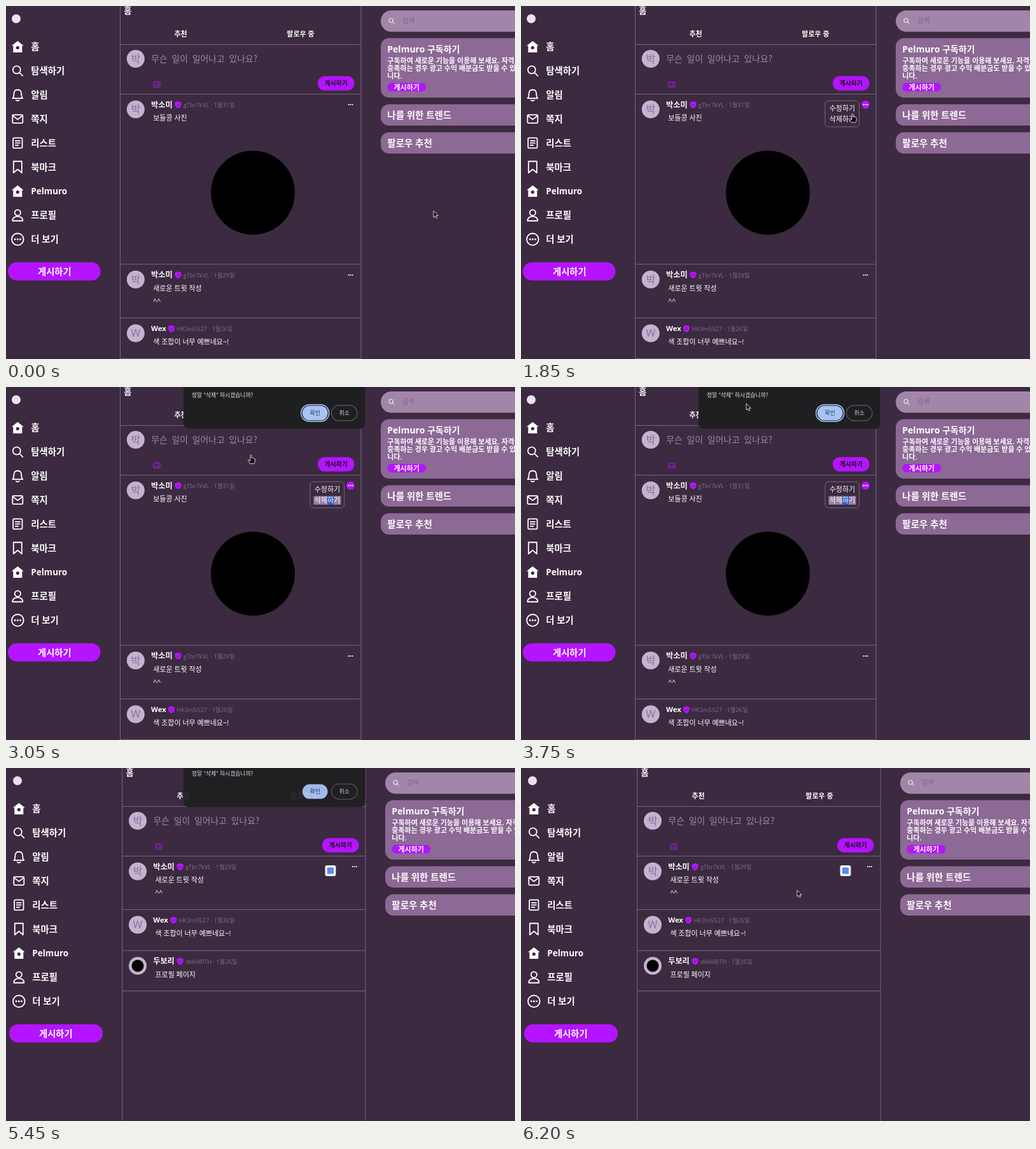
Recreate the animation shown at these times as an HTML page. Size 800 by 555 pixels, loop 6250 ms.

```html
<!DOCTYPE html>
<html lang="ko">
<head>
<meta charset="utf-8">
<title>홈</title>
<style>
html, body { margin: 0; width: 100%; height: 100%; overflow: hidden; background: #3c2a40; }
svg { display: block; width: 800px; height: 555px; }
text { font-family: "Open Sans", "Noto Sans CJK KR", "Noto Sans CJK", sans-serif; white-space: pre; }
text.mono { font-family: "Noto Sans Mono CJK KR", "Noto Sans CJK KR", "Noto Sans CJK", monospace; }
</style>
</head>
<body>
<svg id="stage" viewBox="0 0 800 555" xmlns="http://www.w3.org/2000/svg"></svg>
<script>
const LOOP = 6250, STEP = 50;
const C = {
  bg: '#3c2a40', line: '#7a6482', accent: '#b414ff', muted: '#876891', hint: '#a287ab',
  search: '#a286a9', card: '#8d6996', face: '#c5b2ce', letter: '#8f6b99', white: '#fff'
};

// Text is placed by its vertical centre.
function label(x, cy, size, str, o = {}) {
  return `<text x="${x}" y="${cy + size * 0.365}" font-size="${size}" font-weight="${o.w || 400}"
    fill="${o.c || C.white}" text-anchor="${o.a || 'start'}" class="${o.k || ''}">${str}</text>`;
}
const bold = (x, cy, size, str, c) => label(x, cy, size, str, { w: 700, c });
const rect = (x, y, w, h, r, fill, extra = '') =>
  `<rect x="${x}" y="${y}" width="${w}" height="${h}" rx="${r}" fill="${fill}" ${extra}/>`;
const disc = (x, y, r, fill, extra = '') => `<circle cx="${x}" cy="${y}" r="${r}" fill="${fill}" ${extra}/>`;
const path = (d, fill, extra = '') => `<path d="${d}" fill="${fill}" ${extra}/>`;
const line = (x1, y1, x2, y2) => path(`M${x1} ${y1}L${x2} ${y2}`, 'none', `stroke="${C.line}"`);
const at = (x, y, body) => `<g transform="translate(${x} ${y})">${body}</g>`;
const dots = (x, y, gap, r) => [-1, 0, 1].map(i => disc(x + i * gap, y, r, C.white)).join('');

const pen = `stroke="${C.white}" stroke-width="1.8" stroke-linejoin="round" stroke-linecap="round"`;
const glass = s => `<g transform="scale(${s})">` + disc(-1.5, -1.5, 6, 'none', pen) + path('M3 3L8 8', 'none', pen) + '</g>';
const icons = {
  home: path('M0 -9L9.5 -1.5H7V9H-7V-1.5H-9.5Z', C.white) + disc(0, 1.5, 2.6, C.bg),
  search: glass(1),
  bell: path('M-8 5.5C-5 3 -6.5 -1 -5.5 -4C-4.5 -9.3 4.5 -9.3 5.5 -4C6.5 -1 5 3 8 5.5Z', 'none', pen) +
    path('M-2.5 8.2Q0 10.5 2.5 8.2', 'none', pen),
  mail: rect(-8, -6.5, 16, 13, 1.5, 'none', pen) + path('M-7.5 -5L0 0.8L7.5 -5', 'none', pen),
  list: rect(-7.2, -8, 14.4, 16, 1.5, 'none', pen) +
    path('M-3.5 -3.5H3.5M-3.5 0H3.5M-3.5 3.5H1', 'none', pen),
  mark: path('M-6.5 -9H6.5V9L0 3.5L-6.5 9Z', 'none', pen),
  user: disc(0, -4, 4.6, 'none', pen) + path('M-8 8.8C-8.5 -0.5 8.5 -0.5 8 8.8Z', 'none', pen),
  more: disc(0, 0, 9.3, 'none', pen) + dots(0, 0, 4.2, 1.5)
};
const menu = [
  ['home', '홈'], ['search', '탐색하기'], ['bell', '알림'], ['mail', '쪽지'], ['list', '리스트'],
  ['mark', '북마크'], ['home', 'Pelmuro'], ['user', '프로필'], ['more', '더 보기']
];

function sidebar(dx, btnW) {
  const rows = menu.map(([icon, name], i) => {
    const y = 64 + i * 37.85;
    return at(18.3 + dx, y, icons[icon]) + bold(39.3 + dx, y, name === 'Pelmuro' ? 13.5 : 14.4, name);
  });
  return disc(16 + dx, 20, 7, '#e9e2ec') + rows.join('') +
    rect(3 + dx, 403, btnW, 28.5, 14, C.accent) + bold(50 + dx, 417.5, 14.3, '게시하기');
}

function avatar(x, y, letter) {
  return disc(x, y, 14, C.face) + (letter
    ? label(x, y, 16, letter, { c: C.letter, a: 'middle' })
    : disc(x, y, 9.5, '#000'));
}

const shield = path('M0 -5.5L5 -3.8V0Q4.6 4 0 5.8Q-4.6 4 -5 0V-3.8Z', C.accent) +
  path('M-2 0L-0.5 1.6L2.2 -1.4', 'none', `stroke="${C.bg}" stroke-width="0.9"`);

const people = {
  park: { name: '박소미', letter: '박', id: 'gTbr7kVL', w: 34 },
  wex: { name: 'Wex', letter: 'W', id: 'HK3m5527', w: 23.5, size: 11.3 },
  duri: { name: '두보리', letter: '', id: 'dk8eRlTH', w: 34 }
};

function post(left, top, who, date, lines) {
  const p = people[who], x = left + 48.5, y = top + 16.8;
  return avatar(left + 24.3, top + 24, p.letter) + bold(x, y, p.size || 12.2, p.name) +
    at(x + p.w + 8.5, y, shield) +
    label(x + p.w + 16.8, y + 0.7, 9.3, `${p.id} · ${date}`, { c: C.muted }) +
    lines.map((s, i) => label(x + 3.2, top + 37.8 + i * 20, 11, s)).join('');
}

function feed(left, right, tab1, tab2, rules) {
  const x = left + 48.8, btn = right - 68;
  return line(left, 0, left, 555) + line(right, 0, right, 555) +
    rules.map(y => line(left, y, right, y)).join('') +
    bold(left + 5.7, 7.5, 13.2, '홈') +
    label(tab1, 44.3, 11, '추천', { w: 700, a: 'middle' }) +
    label(tab2, 44.3, 11, '팔로우 중', { w: 700, a: 'middle' }) +
    avatar(left + 24.3, 83, '박') +
    label(x, 83, 13.8, '무슨 일이 일어나고 있나요?', { c: C.hint, k: 'mono' }) +
    at(left + 57.5, 123.5, rect(-5, -4, 10, 8, 1, 'none', `stroke="${C.accent}"`) +
      path('M-4.5 3L-1.5 -0.5L0.5 1.5L2 0.2L4.5 3', 'none', `stroke="${C.accent}"`) +
      disc(2, -1.5, 0.8, C.accent)) +
    rect(btn, 110.3, 57.5, 22.5, 11, C.accent) + bold(btn + 10.7, 121.8, 9.8, '게시하기', '#1c0f20');
}

function aside(x) {
  const box = (y, h, r, c) => rect(x, y, 300, h, r, c), tx = x + 10.3;
  const note = ['구독하여 새로운 기능을 이용해 보세요. 자격을', '충족하는 경우 광고 수익 배분금도 받을 수 있습', '니다.'];
  return box(7, 33.5, 16.5, C.search) + at(x + 17, 23.5, glass(0.55)) +
    label(x + 33.5, 23.3, 10.9, '검색', { c: '#82648a' }) +
    box(50.5, 93.5, 13, C.card) + bold(tx, 68, 14, 'Pelmuro 구독하기') +
    note.map((s, i) => bold(tx, 85.7 + i * 12.1, 11, s)).join('') +
    rect(tx, 121, 61, 13.3, 6.6, C.accent) + bold(tx + 10.2, 127.9, 11, '게시하기') +
    box(154.5, 33.5, 13, C.card) + bold(tx, 171.3, 14.5, '나를 위한 트렌드') +
    box(198.5, 33.5, 13, C.card) + bold(tx, 215.3, 14.5, '팔로우 추천');
}

const hello = ['새로운 트윗 작성', '^^'], praise = ['색 조합이 너무 예쁘네요~!'];

const before = sidebar(0, 145.5) +
  feed(179.5, 558, 274.5, 463, [60.5, 138.5, 406, 490.5, 554.5]) +
  post(179.5, 138.5, 'park', '1월31일', ['보들콩 사진']) + disc(388, 293.5, 66, '#000') +
  `<g id="hot">${disc(541.5, 155, 6.5, C.accent)}</g>` + dots(541.5, 155, 3, 1.1) +
  post(179.5, 406, 'park', '1월29일', hello) + dots(541.5, 423, 3, 1.1) +
  post(179.5, 490.5, 'wex', '1월26일', praise) + aside(589) +
  `<g id="popup">${rect(478, 149, 53.5, 41, 5, C.bg, `stroke="${C.line}"`)}
    <g id="hover">${rect(483.5, 171.5, 43, 13.5, 0, '#9a80a3')}</g>
    <g id="chosen">${rect(505, 171.5, 10.3, 13.5, 0, '#2f62c4')}</g>
    ${label(484.7, 160.5, 11, '수정하기')}${label(484.7, 178.3, 11, '삭제하기')}</g>`;

const after = sidebar(2, 147) +
  feed(182.7, 565, 278.5, 469, [60.5, 138.5, 222.5, 287, 350.5]) +
  post(182.7, 138.5, 'park', '1월29일', hello) + dots(548, 155, 3, 1.1) +
  rect(501.5, 153, 17, 17, 3, '#f1f1f5') + rect(505, 156.5, 10, 10, 0, '#5b8def') +
  post(182.7, 222.5, 'wex', '1월26일', praise) +
  post(182.7, 287, 'duri', '1월26일', ['프로필 페이지']) + aside(596);

const dialog = rect(279, -30, 285.5, 95.5, 8, '#1f1f21', 'stroke="#2d2830" stroke-width="0.8"') +
  label(292, 12.5, 8.8, '정말 "삭제" 하시겠습니까?', { c: '#e6e4e8' }) +
  `<g id="ring">${rect(463.7, 27.7, 44, 26.6, 13.3, 'none', 'stroke="#a8c7fa" stroke-width="1.5"')}</g>` +
  rect(465.8, 29.5, 39.8, 23, 11.5, '#a8c3f2') +
  label(485.7, 41, 9, '확인', { c: '#20386b', a: 'middle' }) +
  rect(511.5, 29, 40.5, 24, 12, 'none', 'stroke="#5b5068" stroke-width="1.3"') +
  label(531.7, 41, 9, '취소', { c: '#c9d3ea', a: 'middle' });

const ink = 'stroke="#e8e4ea" stroke-width="0.9" stroke-linejoin="round"';
const arrow = path('M0 0V10.2L2.3 8.1L3.9 11.6L5.6 10.8L4.1 7.5H7.2Z', '#0b0a0c', ink);
const hand = path('M-1 1Q0 -0.6 1 1V5L2.8 5.2L4.6 5.7L6.3 6.6V10.5L5 14H-1.8L-4.5 9.5Q-4.6 7.6 -3 8.3L-1 10Z', '#0b0a0c', ink);

const group = (id, body) => `<g id="${id}">${body}</g>`;
document.getElementById('stage').innerHTML = rect(0, 0, 800, 555, 0, C.bg) +
  group('before', before) + group('after', after) + group('dialog', dialog) +
  group('cursor', group('arrow', arrow) + group('hand', hand));

const el = {};
document.querySelectorAll('g[id]').forEach(g => el[g.id] = g);
const show = (id, on) => el[id].setAttribute('display', on ? 'inline' : 'none');
const move = (id, x, y) => el[id].setAttribute('transform', `translate(${x} ${y})`);
const clamp = v => v < 0 ? 0 : v > 1 ? 1 : v;

// Pointer stops: time, x, y
const stops = [
  [0, 672, 322], [300, 672, 322], [800, 545, 153], [1500, 545, 153], [2050, 510.5, 176],
  [2850, 510.5, 176], [3050, 385, 106.5], [3500, 334, 24], [3600, 334, 24], [4250, 482, 38],
  [5900, 482, 38], [6200, 434, 192], [LOOP, 434, 192]
];

function pointer(t) {
  const i = stops.findIndex(s => s[0] > t), a = stops[i - 1], b = stops[i];
  const p = clamp((t - a[0]) / (b[0] - a[0])), e = p * p * (3 - 2 * p);
  return [a[1] + (b[1] - a[1]) * e, a[2] + (b[2] - a[2]) * e];
}

function draw(t) {
  const removed = t >= 5400;
  show('before', !removed);
  show('after', removed);
  show('hot', t >= 750);
  show('popup', t >= 1200);
  show('hover', t >= 1900);
  show('chosen', t >= 2400);

  const enter = clamp((t - 2350) / 300), leave = clamp((t - 5250) / 350);
  show('dialog', enter > 0 && leave < 1);
  show('ring', leave === 0);
  move('dialog', 0, -20 * (1 - enter) - 12 * leave * leave);
  el.dialog.setAttribute('opacity', enter * enter * (1 - leave ** 5));

  const [x, y] = pointer(t), pointing = t >= 750 && t < 3300;
  move('cursor', x, y);
  show('cursor', t < 5400 || t >= 5550);
  show('hand', pointing);
  show('arrow', !pointing);
}

const start = performance.now();
function tick() {
  const t = (performance.now() - start) % LOOP;
  draw(Math.floor(t / STEP) * STEP);
  requestAnimationFrame(tick);
}
draw(0);
requestAnimationFrame(tick);
</script>
</body>
</html>
```
